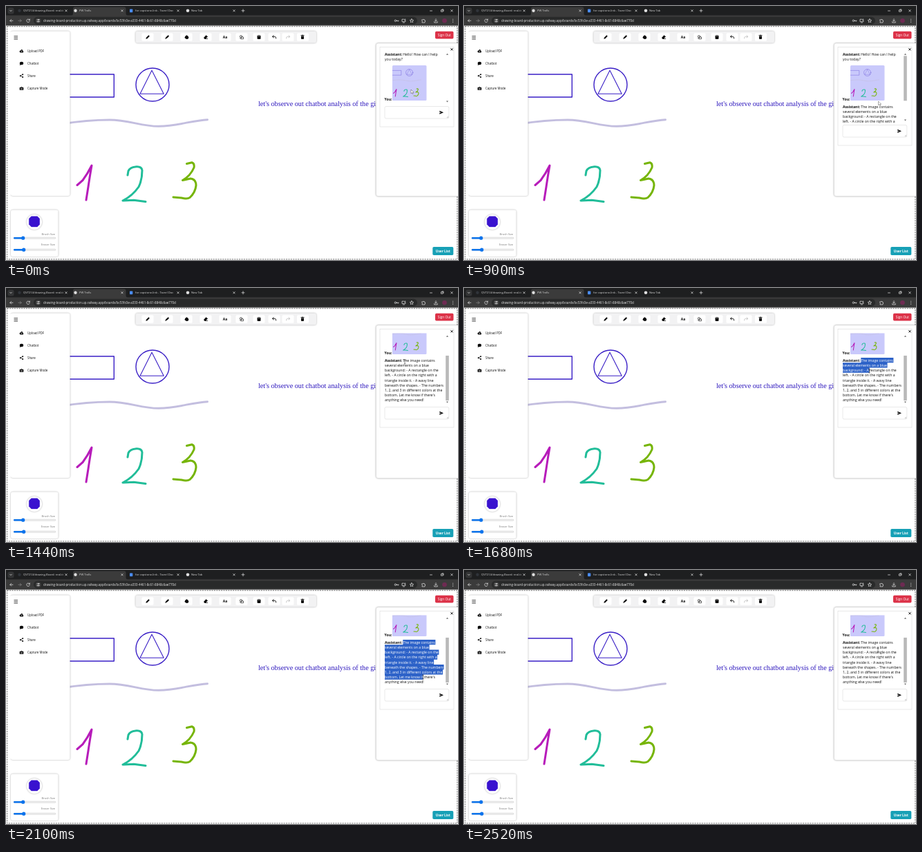
Animation, 654 px wide and 368 px high, one loop 2580 ms. Source, as an HTML page:

```html
<!DOCTYPE html>
<html lang="en">
<head>
<meta charset="utf-8">
<title>Drawing board</title>
<style>
html, body { margin: 0; width: 100%; height: 100%; overflow: hidden; background: #fff; }
svg { display: block; width: 654px; height: 368px; }
text { font-family: "Open Sans", "Noto Sans", sans-serif; white-space: pre; }
.tab { font-size: 4.1px; fill: #d6d6d6; }
.item { font-size: 4.4px; fill: #111; font-weight: 500; }
.chat { font-size: 5.15px; fill: #111; }
.b { font-weight: 700; }
.tiny { font-size: 4px; fill: #777; text-anchor: end; }
.btn { font-size: 4.8px; fill: #fff; text-anchor: middle; }
.ln { fill: none; stroke-linecap: round; stroke-linejoin: round; }
.card { fill: #fff; filter: drop-shadow(0 .7px 1.3px rgba(0,0,0,.33)); }
.bar { stroke: #dadada; stroke-width: .6; fill: none; }
.pen { stroke-width: var(--pen, 3); }
</style>
</head>
<body>
<svg viewBox="0 0 654 368" xmlns="http://www.w3.org/2000/svg">
  <defs>
    <clipPath id="thumbClip"><rect x="559" y="86" width="49.5" height="51" rx="1.5"/></clipPath>
    <clipPath id="viewClip"><rect id="view" x="542" y="65.5" width="94" height="77"/></clipPath>
    <clipPath id="selClip"></clipPath>
  </defs>
  <rect width="654" height="368" fill="#fff"/>

  <!-- canvas drawing -->
  <g id="art" class="ln">
    <g stroke="#3a1fc6">
      <rect x="60" y="99" width="96.3" height="33" stroke-width="1.4"/>
      <circle cx="212" cy="114" r="24" stroke-width="1.4"/>
      <path d="M211 93.3L194 127.2H228.2Z" stroke-width="1.1"/>
    </g>
    <path d="M80 171C105 167 130 165 150 165C178 165 196 174.500 221 174.300C248 174 268 166 291.500 164.700" stroke="#c3bedf" stroke-width="2.900"/>
    <g class="pen">
      <path d="M103 259.500L111 252.500Q118 243 124 231Q121 248 119 262L116 281" stroke="#b71cba"/>
      <path d="M176 245L177 239Q180 233.500 187 233Q196 232 197 238Q197 252 192 262Q183 275 169 282L185 281.300L202 283.500" stroke="#21bd99"/>
      <path d="M261.500 228.500L269 226.700Q273 228 272 234Q267 246 255.500 252.500L267 250Q275 251 275 260Q274 270 266 277.500Q262 280 254 278L242 277" stroke="#76b508"/>
    </g>
  </g>
  <text x="365" y="145" font-size="10.2" fill="#2d17bd" style="font-family:'Liberation Serif',serif">let's observe out chatbot analysis of the given</text>
  <rect x="1.700" y="29.700" width="651.200" height="337.200" fill="none" stroke="#333" stroke-width=".68" stroke-dasharray="2.040 1.360"/>

  <!-- browser chrome -->
  <rect width="654" height="14" fill="#1e1f20"/>
  <rect y="13.500" width="654" height="15" fill="#3b3b3b"/>
  <path d="M95 14Q97 13.500 97 11V4Q97 1.500 99.500 1.500H171Q173.500 1.500 173.500 4V11Q173.500 13.500 176 14Z" fill="#3b3b3b"/>
  <rect x="2.500" y="2.500" width="9" height="9" rx="2.500" fill="#343536"/>
  <rect x="40" y="15.700" width="555" height="11" rx="5.500" fill="#292a2a"/>
  <circle cx="46.700" cy="21.300" r="4" fill="#3b3b3b"/>
  <circle cx="19.500" cy="6.800" r="2.200" fill="#30343a"/>
  <circle cx="100.500" cy="6.800" r="2.200" fill="#dedede"/>
  <rect x="179" y="4.500" width="4.300" height="4.700" rx=".6" fill="#4a8cf5"/>
  <circle cx="263" cy="6.800" r="2.300" fill="#e0e0e0"/>
  <g class="tab">
    <text x="25" y="8.400">QV7214/drawing-Board: real-ti</text>
    <text x="106" y="8.400">PW Trells</text>
    <text x="187" y="8.400">for capstone-link - Tavrel Doc</text>
    <text x="268" y="8.400">New Tab</text>
    <text x="54" y="22.900" style="font-size:4.54px;fill:#e8e8e8">drawing-board-production.up.railway.app/boards/bc53fc0e-a333-4461-8c61-8848c6ae770d</text>
  </g>
  <g id="chrome" class="ln" stroke="#dcdcdc" stroke-width=".75">
    <path d="M5.700 6.300L7 7.600L8.300 6.300M341 6.800H345M343 4.800V8.800M613.500 7H616.500M629.800 5.800H632.200V8.200H629.800ZM630.700 5V4.900H633V7.400M643.700 5.500L646.300 8.100M646.300 5.500L643.700 8.100"/>
    <path d="M10 21.300H5.800M7.700 19.400L5.800 21.300L7.700 23.200M34 20A2.300 2.300 0 1 0 34.300 22M34.400 18.900V20.400H32.800"/>
    <path d="M18 21.300H22.200M20.300 19.400L22.200 21.300L20.300 23.200" stroke="#858585"/>
    <path d="M44.800 20H46M47.700 20H48.700M44.800 22.600H45.600M47.300 22.600H48.700"/>
    <circle cx="46.900" cy="20" r=".6"/><circle cx="46.500" cy="22.600" r=".6"/>
    <circle cx="563.500" cy="21.300" r="1.300"/><path d="M564.800 21.300H568M567.200 21.300V22.300"/>
    <path d="M575.500 19.200H573V22.700H578V21.500M574.500 24H576.500M577.300 18.800V20.700M576.400 20L577.300 20.900L578.200 20"/>
    <path d="M587 18.700L587.800 20.400L589.700 20.600L588.300 21.900L588.700 23.700L587 22.800L585.300 23.700L585.700 21.900L584.300 20.600L586.200 20.400Z"/>
    <path d="M602 20H603.200Q604 18 604.800 20H606V21.200Q608 22 606 22.800V24H602V22.800Q603.500 22 602 21.200Z"/>
    <path d="M622 18.700V22M620.600 20.800L622 22.200L623.400 20.800M619.700 22.700V24H624.300V22.700"/>
    <path d="M646.700 19.200V19.300M646.700 21.300V21.400M646.700 23.400V23.500" stroke-width="1"/>
  </g>
  <circle cx="634.500" cy="21.200" r="3.300" fill="#6e2b52"/>

  <!-- toolbar -->
  <rect class="card" x="187.500" y="36.500" width="261.500" height="17" rx="3" style="fill:#f2f2f3"/>
  <g id="buttons"></g>
  <g id="tools" fill="#0a0a0a">
    <path d="M202.300 47.800L202.900 45.700L206.300 42.300L207.800 43.800L204.400 47.200Z"/>
    <path d="M230.300 48C230.500 45.500 232 44.500 233.500 43.200L234.800 42.200L236 43.500L235 44.800C234 46.500 232.500 47 230.300 48Z"/>
    <path d="M259 44.500Q259 43.800 259.700 44V43Q260.400 42.300 261 43V42.600Q261.700 42 262.200 42.700V43.300Q263.200 42.700 263.300 43.700V44.300Q264.200 44 264.200 45V46.500Q263.500 48 261.500 48Q259.500 47.500 258.300 45.700Q258.300 45 259 45.300Z"/>
    <path d="M286 46L289.500 42.300L292 44.500L289 47.300H292V48H287.500Z"/>
    <text x="317" y="46.900" font-size="5" font-weight="700" text-anchor="middle">Aa</text>
    <g class="ln" stroke="#222" stroke-width=".7"><circle cx="340" cy="44.200" r="1.600"/><path d="M340.500 45H343.500V47.700H340.500ZM338.500 46.500L339.700 47.700"/></g>
    <path d="M363.500 43Q366 41.700 368.500 43V47.500Q366 48.700 363.500 47.500Z"/><path d="M364.500 43.400H367.500" stroke="#fff" stroke-width=".5"/>
    <path class="ln" d="M387.300 42.700L385.500 44.300L387.300 45.900M385.700 44.300H389Q391 44.600 390.700 47" stroke="#111" stroke-width=".9"/>
    <path class="ln" d="M409 42.700L410.800 44.300L409 45.900M410.600 44.300H407.300Q405.300 44.600 405.600 47" stroke="#bbb" stroke-width=".8"/>
    <path d="M426.500 42.300H428L428.300 41.700H429.700L430 42.300H431.500V43H426.500ZM426.900 43.500H431.100L430.800 48H427.200Z"/>
  </g>

  <!-- menu -->
  <rect class="card" x="7" y="36.500" width="85.500" height="238.500" rx="3"/>
  <rect x="3.500" y="37.500" width="20" height="236" fill="#fff"/>
  <path d="M11.500 43.700H17M11.500 45.900H17M11.500 48.100H17" stroke="#222" stroke-width=".8"/>
  <g class="item">
    <text x="31" y="66.700">Upload PDF</text><text x="31" y="84.700">Chatbot</text>
    <text x="31" y="102.800">Share</text><text x="31" y="120.900">Capture Mode</text>
  </g>
  <g fill="#0a0a0a">
    <path d="M20.800 67.400Q19.300 67 19.600 65.500Q20 64.500 21 64.600Q21.700 62.700 23.400 63.200Q24.600 63.800 24.400 65Q25.600 65.500 25.200 66.700Q24.900 67.400 24.200 67.400Z"/>
    <path d="M22.500 66.700V64.800M21.700 65.500L22.500 64.700L23.300 65.500" stroke="#fff" stroke-width=".5" fill="none"/>
    <ellipse cx="22.500" cy="83" rx="2.700" ry="2.200"/><path d="M20.300 84L19.800 86L22 85Z"/>
    <path class="ln" d="M24.200 99.300L20.800 101.200L24.200 103" stroke="#111" stroke-width=".7"/>
    <circle cx="24.200" cy="99.300" r="1"/><circle cx="20.800" cy="101.200" r="1"/><circle cx="24.200" cy="103" r="1"/>
    <path d="M19.700 118H21L21.500 117.200H23.500L24 118H25.300V121.700H19.700Z"/><circle cx="22.500" cy="119.800" r="1" fill="none" stroke="#fff" stroke-width=".5"/>
  </g>

  <!-- brush panel -->
  <rect class="card" x="7" y="295.500" width="68.500" height="67.500" rx="3"/>
  <circle class="card" cx="41" cy="313" r="11"/>
  <path d="M36.700 304.800H45.300L48.700 308.100V316.500L45.300 319.900H36.700L33.300 316.500V308.100Z" fill="#3912cf" stroke="#3912cf" stroke-width=".4" stroke-linejoin="round"/>
  <text class="tiny" x="71" y="331.700">Brush Size</text><text class="tiny" x="71" y="347.300">Eraser Size</text>
  <g id="sliders"></g>

  <rect x="621" y="36.700" width="26.500" height="10.700" rx="1.700" fill="#dc3248"/>
  <text class="btn" x="634.300" y="43.800">Sign Out</text>
  <rect x="617.300" y="349" width="30" height="12" rx="1.700" fill="#17a0b6"/>
  <text class="btn b" x="632.300" y="356.800">User List</text>

  <!-- chat -->
  <rect class="card" x="535.500" y="54" width="122" height="221.500" rx="3" stroke="#d6d6d6" stroke-width=".5"/>
  <path d="M643.400 61.200L646.600 64.400M646.600 61.200L643.400 64.400" stroke="#111" stroke-width="1"/>
  <rect id="box" class="bar" x="541" y="59.500" width="107" height="115.500"/>
  <g clip-path="url(#viewClip)">
    <g id="log">
      <text class="chat b" x="548" y="72">Assistant:</text>
      <text class="chat" x="574.300" y="72">Hello! How can I help</text>
      <text class="chat" x="548" y="79.200">you today?</text>
      <g clip-path="url(#thumbClip)">
        <rect x="559" y="86" width="50" height="51" fill="#c9c9fb"/>
        <use href="#art" transform="translate(538.700 73) scale(.212 .206)" style="--pen:5"/>
      </g>
      <text class="chat b" x="547.500" y="137.200">You:</text>
      <g id="reply">
        <text class="chat b" x="548" y="147.700">Assistant:</text>
        <g id="words" class="chat"></g>
        <g clip-path="url(#selClip)">
          <rect x="545" y="140" width="95" height="70" fill="#2d62c8"/>
          <g id="picked" class="chat" style="fill:#fff"></g>
        </g>
      </g>
    </g>
  </g>
  <path d="M636.900 70.700L638.500 68.700L640.100 70.700Z" fill="#666"/>
  <path id="down" d="M636.900 137.500L638.500 139.500L640.100 137.500Z" fill="#666"/>
  <rect id="thumb" x="636.200" y="72.500" width="4.600" height="65" fill="#b9b9b9"/>
  <g id="entry">
    <rect class="bar" x="548" y="145.500" width="92.800" height="17.500" rx="2"/>
    <path d="M627.300 151.700L633 154.200L627.300 156.700V154.800L630.500 154.200L627.300 153.600Z" fill="#000"/>
    <path d="M637.800 162L640 159.800M639.200 162.200L640.200 161.200" stroke="#888" stroke-width=".5"/>
  </g>

  <path id="arrow" d="M0 0V5.800L1.400 4.500L2.300 6.500L3.200 6.100L2.300 4.200H4.200Z" fill="#fff" stroke="#444" stroke-width=".45"/>
  <path id="beam" class="ln" d="M-1 -2.800H1M0 -2.800V2.800M-1 2.800H1" stroke="#333" stroke-width=".55"/>
</svg>
<script>
const LOOP = 2580, STEP = 60, PITCH = 7.2, TOP = 142, SCROLL = 41;
const REPLY_AT = 720, PICK_FROM = 1500, PICK_TO = 2100, CLEAR_AT = 2400;
const LINES = [
  "The image contains", "several elements on a blue", "background: - A rectangle on the",
  "left. - A circle on the right with a", "triangle inside it. - A wavy line",
  "beneath the shapes. - The numbers", "1, 2, and 3 in different colors at the",
  "bottom. Let me know if there's", "anything else you need!"
];
// pointer stops: time, x, y
const PATH = [
  [0, 586, 121], [480, 618.5, 115.5], [900, 599.5, 138], [1020, 599, 137], [1440, 577, 107],
  [1500, 574.5, 105], [1860, 598.5, 135], [2100, 603.5, 155], [2220, 603.5, 155], [2520, 599, 116]
];
const $ = id => document.getElementById(id);
const add = (parent, tag, attrs, text) => {
  const el = document.createElementNS("http://www.w3.org/2000/svg", tag);
  for (const k in attrs) el.setAttribute(k, attrs[k]);
  if (text) el.textContent = text;
  return parent.appendChild(el);
};
const set = (id, attrs) => { for (const k in attrs) $(id).setAttribute(k, attrs[k]); };
const show = (id, on) => set(id, { visibility: on ? "visible" : "hidden" });
const ease = u => { u = Math.max(0, Math.min(1, u)); return u * u * (3 - 2 * u); };
const left = i => i ? 548 : 574.3;

for (const x of [205, 233, 261, 289, 317, 341, 366, 388, 408, 429.5])
  add($("buttons"), "rect", { x: x - 8.5, y: 39.3, width: 17, height: 11.4, rx: 1.5, fill: "#fff" });

for (const x of [87, 168, 249, 330])
  add($("chrome"), "path", { d: `M${x - 1.2} 5.600l2.400 2.400m0 -2.400l-2.400 2.400` });

for (const [x, y] of [[24.7, 336.2], [25.7, 353.2]]) {
  const g = $("sliders");
  add(g, "rect", { x: 11, y: y - 1.1, width: 61, height: 2.2, rx: 1.1, fill: "#eee", stroke: "#c2c2c2", "stroke-width": .4 });
  add(g, "rect", { x: 11, y: y - 1.2, width: x - 11, height: 2.4, rx: 1.2, fill: "#0b73ec" });
  add(g, "circle", { cx: x, cy: y, r: 2.6, fill: "#0b73ec" });
}

const rows = LINES.map((s, i) => {
  const at = { x: left(i), y: 147.7 + i * PITCH };
  add($("picked"), "text", at, s);
  return {
    text: add($("words"), "text", at, s),
    mark: add($("selClip"), "rect", { x: left(i), y: TOP + i * PITCH, width: 0, height: PITCH + .05 })
  };
});

function pointer(t) {
  let i = 0;
  while (i < PATH.length - 2 && t > PATH[i + 1][0]) i++;
  const [a, x, y] = PATH[i], [b, p, q] = PATH[i + 1], u = ease((t - a) / (b - a));
  return [x + (p - x) * u, y + (q - y) * u];
}

function select(t) {
  const on = t > PICK_FROM && t < CLEAR_AT;
  const [x, y] = pointer(Math.min(t, PICK_TO));
  const last = Math.floor((y + SCROLL - TOP) / PITCH);
  rows.forEach((r, i) => {
    const full = r.text.getComputedTextLength() + .6;
    const part = Math.max(0, Math.min(full, x - left(i)));
    r.mark.setAttribute("width", !on || i > last ? 0 : i < last ? full : part);
  });
}

function draw(t) {
  const open = t >= REPLY_AT, grow = open ? 27 : 0;
  const s = ease((t - 930) / 270);
  set("view", { height: 77 + grow });
  set("box", { height: 115.5 + grow });
  set("entry", { transform: `translate(0 ${grow})` });
  set("down", { transform: `translate(0 ${grow})` });
  set("log", { transform: `translate(0 ${-SCROLL * s})` });
  set("thumb", { y: 72.3 + 25.7 * s });
  show("thumb", open);
  show("reply", open);
  select(t);
  const [x, y] = pointer(t), text = t >= 1260;
  show("arrow", !text);
  show("beam", text);
  set(text ? "beam" : "arrow", { transform: `translate(${x} ${y})` });
}

const start = performance.now();
function tick() {
  const t = (performance.now() - start) % LOOP;
  draw(Math.floor(t / STEP) * STEP);
  requestAnimationFrame(tick);
}
tick();
</script>
</body>
</html>
```
